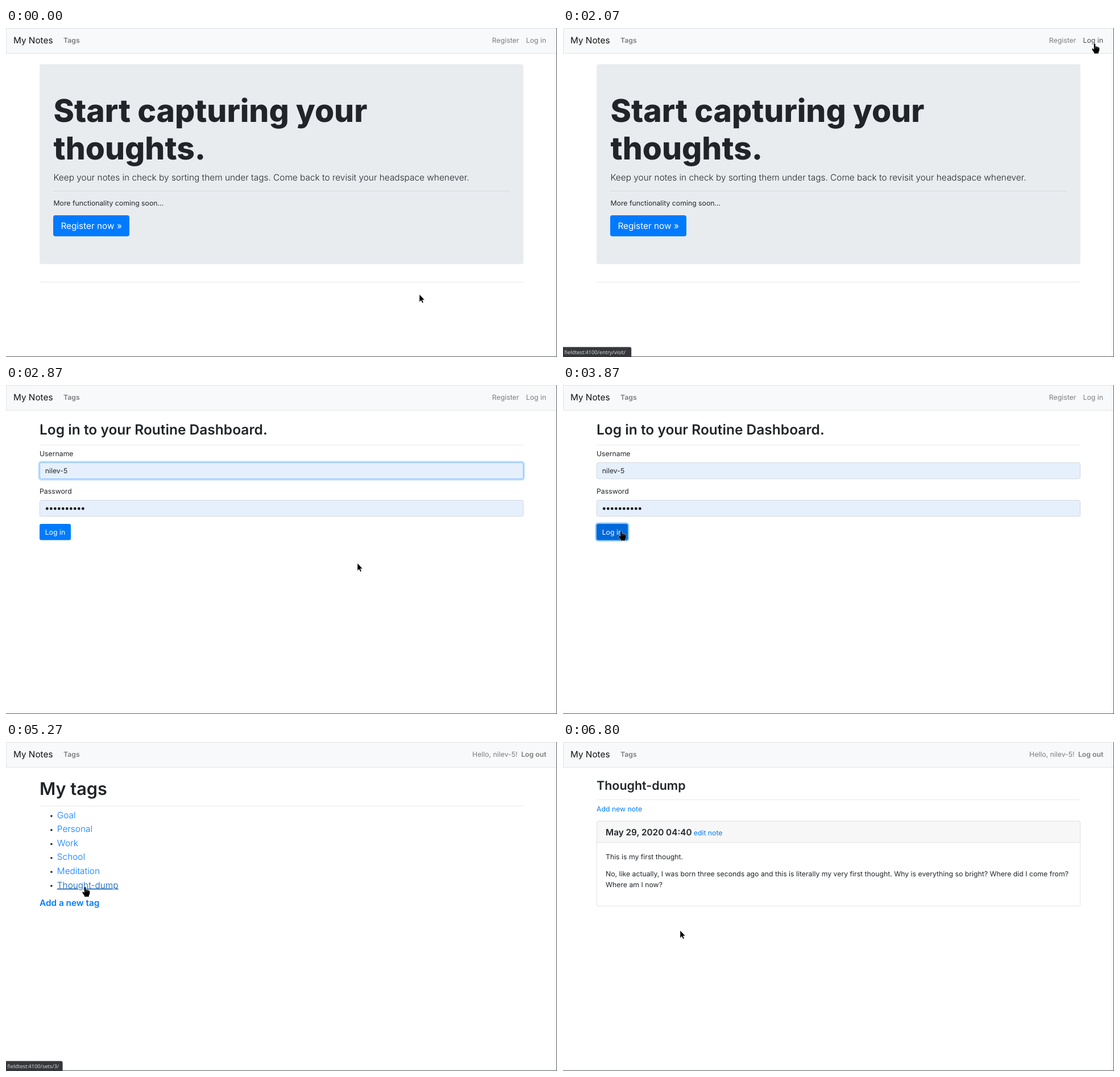
Animation, 969 px wide and 578 px high, one loop 8 s. Source, as an HTML page:

```html
<!DOCTYPE html>
<html lang="en">
<head>
<meta charset="utf-8">
<title>My Notes</title>
<style>
html, body { margin: 0; width: 100%; height: 100%; overflow: hidden; background: #fff; }
svg { display: block; width: 969px; height: 578px; }
text {
  font: 400 12.25px Inter, sans-serif;
  font-optical-sizing: none;
  text-rendering: geometricPrecision;
  fill: #212529;
  white-space: pre;
}
.lg { font-size: 15.33px; }
.lead { font-size: 15.4px; font-weight: 300; }
.semi { font-weight: 600; }
.h1 { font-size: 30.67px; }
.h2 { font-size: 24.53px; }
.h3 { font-size: 21.47px; }
.hero { font-size: 55.2px; font-weight: 800; }
.nav { fill: #000; fill-opacity: .5; }
.link { fill: #007bff; }
.white { fill: #fff; }
.end { text-anchor: end; }
.rule { stroke: #000; stroke-opacity: .1; stroke-width: .9; }
.field { fill: #e6f0fd; stroke: #ced4da; stroke-width: .9; }
.tip { font: 400 9.2px "Open Sans", "Noto Sans", sans-serif; fill: #dfe1e4; }
</style>
</head>
<body>
<svg viewBox="0 0 969 578">
  <rect width="969" height="578" fill="#fff"/>
  <rect x=".5" y=".5" width="968" height="44" fill="#f8f9fa" stroke="#dee2e6" stroke-width=".9"/>
  <text class="lg" x="13" y="27.4" style="fill:#111">My Notes</text>
  <text class="nav semi" x="101" y="26.4">Tags</text>

  <g id="guest">
    <text class="nav end" x="902.3" y="26.4">Register</text>
    <text id="navLogin" class="nav end" x="950" y="26.4">Log in</text>
  </g>
  <g id="member">
    <text class="nav end" x="899.5" y="26.4">Hello, nilev-5!</text>
    <text class="nav semi end" x="950.3" y="26.4">Log out</text>
  </g>

  <g id="home">
    <rect x="59" y="63.4" width="851" height="351.4" rx="3.7" fill="#e9ecef"/>
    <text class="hero" x="83.5" y="165.1">Start capturing your</text>
    <text class="hero" x="83.5" y="231.3">thoughts.</text>
    <text class="lead" x="83.5" y="267.6">Keep your notes in check by sorting them under tags. Come back to revisit your headspace whenever.</text>
    <path class="rule" d="M83.5 286.4H885.5"/>
    <text x="83.5" y="312.3">More functionality coming soon...</text>
    <rect x="83" y="329" width="134" height="37" rx="3.7" fill="#007bff"/>
    <text class="lg white" x="96.4" y="353">Register now »</text>
    <path class="rule" d="M59 446.5H910"/>
  </g>

  <g id="login">
    <text class="h2 semi" x="59" y="86.9">Log in to your Routine Dashboard.</text>
    <path class="rule" d="M59 105.4H910"/>
    <text x="59" y="125.4">Username</text>
    <rect id="ring" x="59" y="136" width="851" height="29.2" rx="3" fill="none" stroke="#007bff"/>
    <rect id="user" class="field" x="59.4" y="136.4" width="850.2" height="28.4" rx="3"/>
    <text x="68.8" y="155.3">nilev-5</text>
    <path id="caret" d="M109.2 144V158.5" stroke="#000" stroke-width=".9"/>
    <text x="59" y="191.2">Password</text>
    <rect class="field" x="59.4" y="202.4" width="850.2" height="28.4" rx="3"/>
    <path d="M72.3 217.2H135.6" stroke="#111" stroke-width="4.7" stroke-linecap="round" stroke-dasharray="0 7"/>
    <rect id="btnRing" x="59" y="244" width="55" height="28.4" rx="3" fill="none" stroke="#268fff"/>
    <rect id="btn" x="59" y="244" width="55" height="28.4" rx="3"/>
    <text class="white" x="68.7" y="262.6">Log in</text>
  </g>

  <g id="tags">
    <text class="h1 semi" x="59" y="93">My tags</text>
    <path class="rule" d="M59 112.6H910"/>
    <g id="list"></g>
    <text class="lg semi link" x="59" y="287.5">Add a new tag</text>
  </g>

  <g id="note">
    <text class="h3 semi" x="59" y="84.2">Thought-dump</text>
    <path class="rule" d="M59 101.4H910"/>
    <text class="link" x="59" y="121.6">Add new note</text>
    <path d="M59.4 177V142a3 3 0 0 1 3-3H906.6a3 3 0 0 1 3 3V177Z" fill="#f7f7f7"/>
    <rect x="59.4" y="139" width="850.2" height="149.2" rx="3" fill="none" stroke="#000" stroke-opacity=".125" stroke-width=".9"/>
    <path class="rule" d="M59.4 176.6H909.6"/>
    <text class="lg semi" x="75" y="163.5">May 29, 2020 04:40</text>
    <text class="link" x="229.8" y="163.5">edit note</text>
    <text x="75" y="205.7">This is my first thought.</text>
    <text x="75" y="236.3">No, like actually, I was born three seconds ago and this is literally my very first thought. Why is everything so bright? Where did I come from?</text>
    <text x="75" y="254.7">Where am I now?</text>
  </g>

  <path d="M968.5 0V578M0 577.5H969" stroke="#5c5e61" fill="none"/>

  <g id="tipLogin">
    <path d="M0 560.6H117.2a3 3 0 0 1 3 3V578H0Z" fill="#36373a"/>
    <text class="tip" x="2.6" y="572.6">fieldtest:4100/entry/visit/</text>
  </g>
  <g id="tipTag">
    <path d="M0 560.6H96.6a3 3 0 0 1 3 3V578H0Z" fill="#36373a"/>
    <text class="tip" x="2.6" y="572.6">fieldtest:4100/sets/3/</text>
  </g>

  <path id="arrow" d="M0 0V13.4L3 10.6L5.1 15.2L7.2 14.3L5.2 9.8H9.2Z" fill="#000" stroke="#fff" stroke-width=".5"/>
  <g id="hand">
    <path d="M-1.5 1.2Q0 -.7 1.5 1.2V5.4Q3 4.6 4 6Q5.5 5.3 6.2 6.7Q8.2 6.2 8.5 8.4V12.6L7 15.6V18H-1.2V16.2L-4.6 11.2Q-5.4 9 -3.4 8.8L-1.5 10.4Z" fill="#000" stroke="#fff" stroke-width=".5"/>
    <path d="M1.5 6V9M4 6.6V9M6.2 7.2V9.2" stroke="#fff" stroke-width=".4"/>
  </g>
</svg>
<script>
const LOOP = 8000;
const el = id => document.getElementById(id);

const names = ["Goal", "Personal", "Work", "School", "Meditation", "Thought-dump"];
el("list").innerHTML = names.map((name, i) => {
  const y = 133.8 + i * 24.55;
  return `<circle cx="79.9" cy="${y - 3.7}" r="1.8" fill="#212529"/>` +
    `<text class="lead link" x="89.8" y="${y}">${name}</text>`;
}).join("");
const lastTag = el("list").lastElementChild;

// pointer track: time, x, y
const track = [
  [470, 727, 468], [560, 730, 470.5], [1270, 943, 61], [1340, 941, 44],
  [1470, 940, 35], [1540, 940, 35], [1700, 935, 27], [2230, 935, 27],
  [2360, 948, 46], [2870, 618, 313], [3000, 614, 324], [3040, 614, 324],
  [3800, 102.5, 255.5], [4640, 102.5, 255.5], [4800, 121, 261], [5000, 139, 254],
  [5930, 139, 254], [6200, 141, 261], [6370, 141, 261], [6800, 206, 331]
];
const handTimes = [[1320, 2330], [3690, 6000]];

const within = (t, a, b) => t >= a && t < b;
const ramp = (t, a, b) => Math.min(1, Math.max(0, (t - a) / (b - a)));
const ease = p => p * p * (3 - 2 * p);
const show = (id, on) => { el(id).style.display = on ? "" : "none"; };

function pointer(t) {
  const i = track.findIndex(k => k[0] > t);
  if (i === 0) return track[0].slice(1);
  if (i < 0) return track[track.length - 1].slice(1);
  const [t0, x0, y0] = track[i - 1], [t1, x1, y1] = track[i];
  const p = ease(ramp(t, t0, t1));
  return [x0 + (x1 - x0) * p, y0 + (y1 - y0) * p];
}

function ringWidth(id, p, alpha) {
  el(id).setAttribute("stroke-width", 4.9 * p);
  el(id).setAttribute("stroke-opacity", alpha * p);
}

function draw(t) {
  show("home", t < 2200);
  show("login", within(t, 2200, 4130));
  show("tags", within(t, 4130, 5930));
  show("note", t >= 5930);
  show("guest", t < 4130);
  show("member", t >= 4130);

  const hover = within(t, 1330, 2200) || within(t, 2265, 2340);
  el("navLogin").style.fillOpacity = hover ? .7 : .5;

  const focus = ramp(t, 2150, 2300) * (1 - ramp(t, 3720, 3860));
  ringWidth("ring", focus, .25);
  el("user").style.stroke = focus > .3 ? "#80bdff" : "#ced4da";
  show("caret", t < 3720 && (t - 2200) % 1000 < 500);

  const press = ramp(t, 3690, 3800);
  el("btn").setAttribute("fill", `rgb(0,${123 - 18 * press},${255 - 38 * press})`);
  ringWidth("btnRing", ramp(t, 3720, 3860), .5);

  const over = t >= 4670;
  lastTag.style.fill = over ? "#0056b3" : "";
  lastTag.style.textDecoration = over ? "underline" : "none";

  el("tipLogin").style.opacity = ramp(t, 1870, 2070) * (1 - ramp(t, 2480, 2680));
  el("tipTag").style.opacity = ramp(t, 5140, 5270) * (1 - ramp(t, 6480, 6680));

  const isHand = handTimes.some(([a, b]) => within(t, a, b));
  const [x, y] = pointer(t);
  show("arrow", !isHand);
  show("hand", isHand);
  el(isHand ? "hand" : "arrow").setAttribute("transform", `translate(${x} ${y})`);
}

const start = performance.now();
function tick() {
  draw((performance.now() - start) % LOOP);
  requestAnimationFrame(tick);
}
tick();
</script>
</body>
</html>
```
